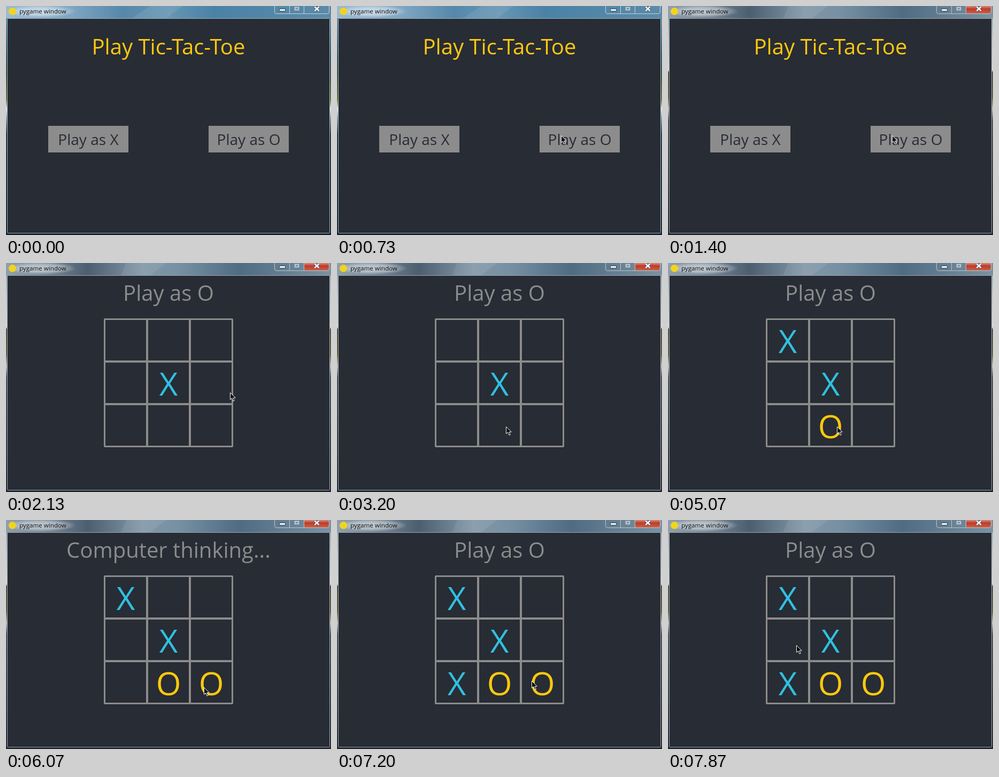
Write an HTML page that moves like this. It is 608x430 px and loops after 8000 ms.

```html
<!DOCTYPE html>
<html lang="en">
<head>
<meta charset="utf-8">
<title>Tic-Tac-Toe</title>
<style>
html, body { margin: 0; width: 100%; height: 100%; overflow: hidden; background: #282c34; }
svg { display: block; width: 608px; height: 430px; }
text { font-family: "Open Sans", sans-serif; }
.caption { font-size: 11.6px; fill: #0b0d10; }
.title, .label, .mark { text-anchor: middle; }
.title { font-size: 40px; fill: #8c8c8c; }
.label { font-size: 28px; fill: #282c34; }
.mark { font-size: 60px; }
.x { fill: #30c0e0; }
.o, .gold { fill: #ffc90e; }
.gray { fill: #8c8c8c; }

/* Everything shares one 8 s clock */
.anim { animation: 8s step-end infinite; }
.idle { animation-name: idle; }
.active { animation-name: active; }
.menu { animation-name: menu; }
.board { animation-name: board; }
.think { animation-name: think; }
.turn { animation-name: turn; }
.m1 { animation-name: m1; }
.m2 { animation-name: m2; }
.m3 { animation-name: m3; }
.m4 { animation-name: m4; }
.m5 { animation-name: m5; }
.cursor { animation-name: cursor; }

@keyframes idle { 0% { opacity: 1 } 17.5%, 100% { opacity: 0 } }
@keyframes active { 0% { opacity: 0 } 17.5%, 100% { opacity: 1 } }
@keyframes menu { 0% { opacity: 1 } 20%, 100% { opacity: 0 } }
@keyframes board { 0% { opacity: 0 } 20%, 100% { opacity: 1 } }
@keyframes think {
  0%, 26.625%, 63.375%, 82.5%, 100% { opacity: 0 }
  20%, 48.375%, 75.875% { opacity: 1 }
}
@keyframes turn {
  0%, 48.375%, 75.875% { opacity: 0 }
  26.625%, 63.375%, 82.5%, 100% { opacity: 1 }
}
@keyframes m1 { 0% { opacity: 0 } 26.625%, 100% { opacity: 1 } }
@keyframes m2 { 0% { opacity: 0 } 48.375%, 100% { opacity: 1 } }
@keyframes m3 { 0% { opacity: 0 } 63.375%, 100% { opacity: 1 } }
@keyframes m4 { 0% { opacity: 0 } 75.875%, 100% { opacity: 1 } }
@keyframes m5 { 0% { opacity: 0 } 82.5%, 100% { opacity: 1 } }

/* The pointer moves in ticks of 1/15 s */
@keyframes cursor {
  0% { transform: translate(700px, 300px) }
  5% { transform: translate(541px, 290px); animation-timing-function: steps(2) }
  6.625% { transform: translate(464px, 261px); animation-timing-function: steps(3) }
  9.125% { transform: translate(419px, 243px) }
  32.5% { transform: translate(411px, 243px) }
  33.375% { transform: translate(402px, 243px) }
  35.875% { transform: translate(392px, 248px); animation-timing-function: steps(2) }
  37.5% { transform: translate(344px, 282px); animation-timing-function: steps(2) }
  40% { transform: translate(316px, 307px) }
  71.625% { transform: translate(324px, 308px); animation-timing-function: steps(4) }
  75% { transform: translate(370px, 314px) }
  90% { transform: translate(364px, 302px); animation-timing-function: steps(4) }
  93.375% { transform: translate(304px, 216px); animation-timing-function: steps(3) }
  95.875% { transform: translate(266px, 174px); animation-timing-function: steps(3) }
  98.375%, 100% { transform: translate(240px, 235px) }
}
</style>
</head>
<body>
<svg viewBox="0 0 608 430">
  <defs>
    <linearGradient id="idleBar">
      <stop offset="0" stop-color="#9dbad0"/>
      <stop offset=".2" stop-color="#7fa6c2"/>
      <stop offset=".36" stop-color="#5688aa"/>
      <stop offset=".5" stop-color="#6796b3"/>
      <stop offset=".64" stop-color="#4a82a6"/>
      <stop offset="1" stop-color="#5c8ba8"/>
    </linearGradient>
    <linearGradient id="activeBar">
      <stop offset="0" stop-color="#8fa0ad"/>
      <stop offset=".17" stop-color="#667888"/>
      <stop offset=".25" stop-color="#4c5f70"/>
      <stop offset=".42" stop-color="#8197a7"/>
      <stop offset=".53" stop-color="#7790a3"/>
      <stop offset=".72" stop-color="#4f6c83"/>
      <stop offset="1" stop-color="#7b92a2"/>
    </linearGradient>
    <linearGradient id="idleSide" x2="0" y2="1">
      <stop offset="0" stop-color="#6f99b3"/>
      <stop offset=".22" stop-color="#35505f"/>
      <stop offset=".3" stop-color="#3e4636"/>
      <stop offset=".41" stop-color="#736b30"/>
      <stop offset=".45" stop-color="#e4e8e8"/>
      <stop offset=".49" stop-color="#8d959a"/>
      <stop offset=".56" stop-color="#2b3138"/>
      <stop offset="1" stop-color="#1b2126"/>
    </linearGradient>
    <linearGradient id="activeSide" x2="0" y2="1">
      <stop offset="0" stop-color="#8c9ba6"/>
      <stop offset=".15" stop-color="#bcc4c8"/>
      <stop offset=".28" stop-color="#d2d6d6"/>
      <stop offset=".29" stop-color="#4a4a34"/>
      <stop offset=".4" stop-color="#5c5934"/>
      <stop offset=".45" stop-color="#b6babb"/>
      <stop offset=".5" stop-color="#454b52"/>
      <stop offset="1" stop-color="#22272d"/>
    </linearGradient>
    <linearGradient id="red" x2="0" y2="1">
      <stop offset="0" stop-color="#d58c80"/>
      <stop offset=".4" stop-color="#bd3c28"/>
      <stop offset="1" stop-color="#c9614a"/>
    </linearGradient>
    <radialGradient id="glow">
      <stop offset="0" stop-color="#fff" stop-opacity=".6"/>
      <stop offset=".6" stop-color="#fff" stop-opacity=".4"/>
      <stop offset="1" stop-color="#fff" stop-opacity="0"/>
    </radialGradient>
    <path id="frame" d="M502.5 -1V11Q502.5 14.5 506 14.5H601Q604.5 14.5 604.5 11V-1M530.5 0V14M557.5 0V14" fill="none"/>
    <g id="glyphs" stroke="#3d4a57">
      <rect x="511.5" y="5.5" width="11" height="4" fill="#fff"/>
      <path d="M539.5 1.5H548.5V8.5H539.5ZM542 4V6H546V4Z" fill="#c3ced6" fill-rule="evenodd" stroke="#8296a5"/>
      <path d="M577.5 1.5L585.5 9M585.5 1.5L577.5 9" stroke-width="4.4"/>
      <path d="M577.5 1.5L585.5 9M585.5 1.5L577.5 9" stroke="#fff" stroke-width="2.6"/>
    </g>
  </defs>

  <g class="anim idle">
    <rect width="608" height="430" fill="url(#idleSide)"/>
    <rect width="608" height="23" fill="url(#idleBar)"/>
    <path d="M270 0H330L300 23H235Z" fill="#fff" opacity=".08"/>
    <use href="#frame" stroke="#c0d5e1"/>
    <rect x="2.5" y="23.5" width="603" height="403" rx="1" fill="#282c34" stroke="#8db4c4"/>
  </g>
  <g class="anim active">
    <rect width="608" height="430" fill="url(#activeSide)"/>
    <rect width="608" height="23" fill="url(#activeBar)"/>
    <path d="M225 0H300L270 23H215Z" fill="#fff" opacity=".08"/>
    <path d="M558 0H604V11Q604 14 601 14H558Z" fill="url(#red)"/>
    <use href="#frame" stroke="#b9c5ce"/>
    <rect x="2.5" y="23.5" width="603" height="403" rx="1" fill="#282c34" stroke="#98a5ae"/>
  </g>
  <use href="#glyphs"/>
  <ellipse cx="66" cy="10" rx="66" ry="12" fill="url(#glow)"/>
  <circle cx="12" cy="10" r="7" fill="#f0d420"/>
  <text class="caption" x="25" y="14">pygame window</text>

  <g class="anim menu">
    <text class="title gold" style="fill:#ffc90e" x="304" y="91">Play Tic-Tac-Toe</text>
    <path class="gray" d="M79 225h150v50h-150zM379 225h150v50h-150z"/>
    <text class="label" x="154" y="261">Play as X</text>
    <text class="label" x="454" y="261">Play as O</text>
  </g>

  <g class="anim board">
    <path class="gray" d="M183 105h3v240h-3zM262 105h4v240h-4zM342 105h4v240h-4zM422 105h3v240h-3z"/>
    <path class="gray" d="M184 104h240v3h-240zM184 183h240v4h-240zM184 263h240v4h-240zM184 343h240v3h-240z"/>
  </g>
  <text class="title anim think" x="304" y="71">Computer thinking...</text>
  <text class="title anim turn" x="304" y="71">Play as O</text>
  <text class="mark x anim m1" x="304" y="249">X</text>
  <text class="mark o anim m2" x="304" y="329">O</text>
  <text class="mark x anim m3" x="224" y="169">X</text>
  <text class="mark o anim m4" x="384" y="329">O</text>
  <text class="mark x anim m5" x="224" y="329">X</text>

  <path class="anim cursor" d="M.5 .5V13.5L3.5 10.8L6 16.3L8.2 15.3L5.8 10.2H10.2Z" fill="#000" stroke="#fff"/>
</svg>
</body>
</html>
```
